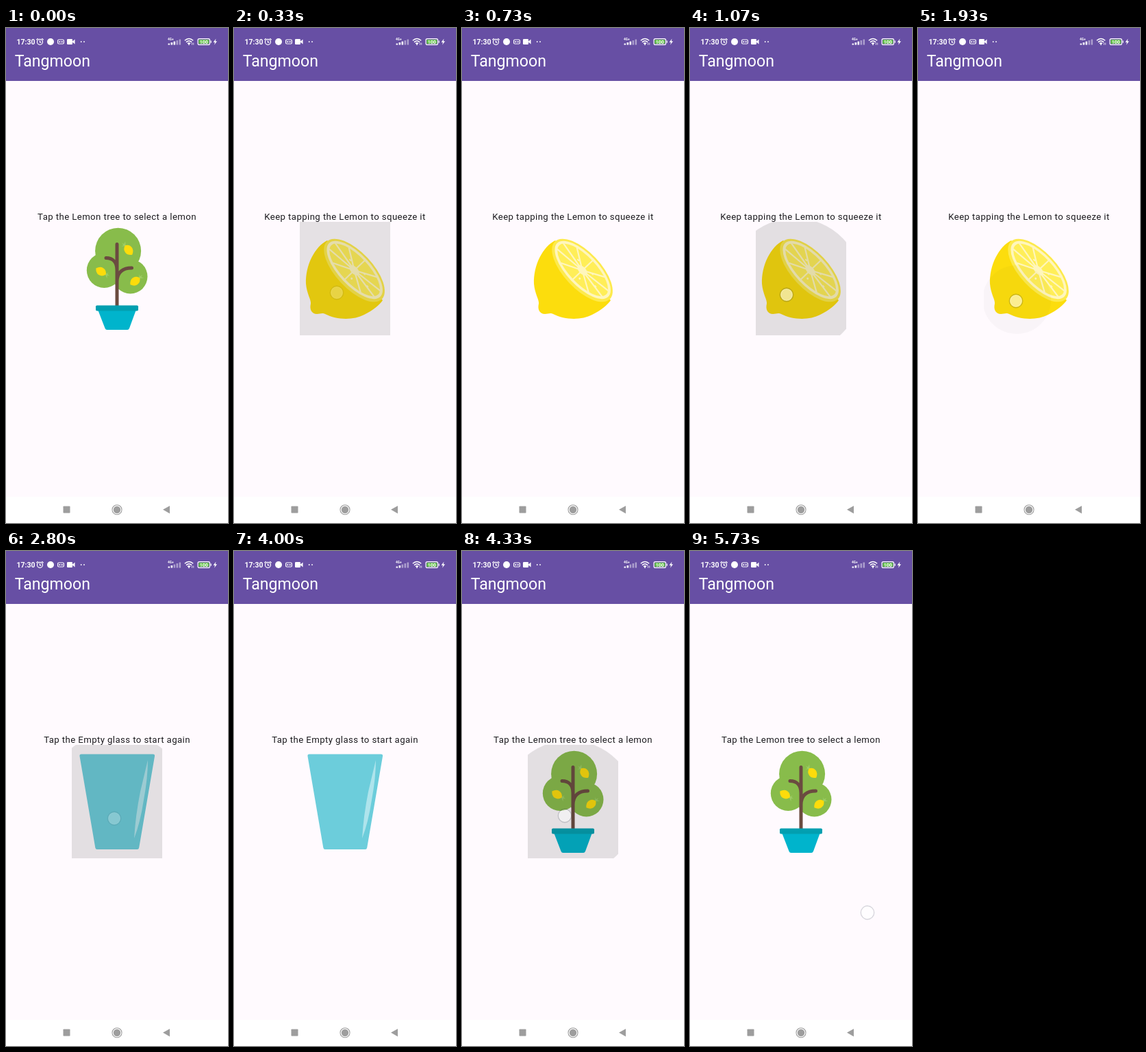
Recreate the animation shown at these times as an HTML page. Size 324x720 px, loop 5940 ms.

```html
<!DOCTYPE html>
<html lang="en">
<head>
<meta charset="utf-8">
<title>Tangmoon</title>
<style>
  html, body { margin: 0; width: 100%; height: 100%; overflow: hidden; background: #fffafe; }
  svg { display: block; width: 100vw; height: 100vh; font-family: Roboto, sans-serif; }
  .scene { visibility: hidden; }
  .scene.on { visibility: visible; }
  .scene text { font-size: 13.2px; letter-spacing: .4125px; text-anchor: middle; fill: #1c1b1f; }
  .line { fill: none; stroke: #fff; stroke-width: 1.2; }
</style>
</head>
<body>
<svg viewBox="0 0 324 720" preserveAspectRatio="none">
  <defs>
    <clipPath id="box"><rect x="96" y="282" width="132" height="165"/></clipPath>
    <path id="cup" d="M110 295.5H214.5Q217.5 295.5 217 298.5L194.2 431.5Q193.8 434 191.5 434H133Q130.700 434 130.300 431.5L107.500 298.5Q107 295.5 110 295.5Z"/>
    <path id="shine" d="M207 304Q207 330 201 362Q196 395 187 418Q189 385 196 350Z" fill="#fff" opacity=".45"/>
    <clipPath id="inCup"><use href="#cup"/></clipPath>
    <g id="fruit">
      <path d="M-7 0L-13 -4L-11 0L-14 1L-10 2L-11 5Z" fill="#9ccc65"/>
      <path d="M-8.500 0Q-6 -6 0 -6Q5 -6 8.500 0Q5 6 0 6Q-6 6 -8.500 0Z" fill="#fddc0b"/>
    </g>
  </defs>

  <rect width="324" height="720" fill="#fffafe"/>
  <rect width="324" height="77" fill="#674fa4"/>
  <text x="12.800" y="55.600" font-size="23.1" fill="#fff">Tangmoon</text>

  <!-- status bar -->
  <g fill="#fff">
    <text x="15.500" y="24" font-size="10.5" font-weight="600">17:30</text>
    <circle class="line" cx="49.500" cy="20.300" r="4"/>
    <path class="line" d="M49.500 17.800V20.800H51.500M44.300 17.300L46.800 15.300M54.700 17.300L52.200 15.300"/>
    <circle cx="65" cy="20" r="5"/>
    <rect class="line" x="75.600" y="17" width="8.800" height="6" rx="1.500"/>
    <path d="M77.300 19.300h2v1.600h-2zM80.700 19.300h2v1.600h-2z"/>
    <rect x="89" y="16" width="8" height="8" rx="1.200"/>
    <path d="M97 19.500L100.500 16.500V23.500L97 20.500Z"/>
    <circle cx="109.700" cy="20" r=".9"/><circle cx="114" cy="20" r=".9"/>
    <text x="236" y="18.300" font-size="4.800" font-weight="700">4G+</text>
    <g id="bars"></g>
    <g class="line">
      <path d="M260.800 18.300Q267 12.700 273.200 18.300M262.900 20.600Q267 17 271.100 20.600M265 22.700Q267 21 269 22.700" stroke-width="1.500"/>
      <path d="M271.500 21.500V24.500M273.700 24.500V21.500" stroke-width=".8"/>
    </g>
    <circle cx="267" cy="24" r="1"/>
    <rect class="line" x="280" y="15.600" width="17.500" height="8.800" rx="2.200"/>
    <rect x="281.300" y="16.900" width="14.900" height="6.200" rx="1" fill="#5fbf45"/>
    <rect x="298.600" y="18.300" width="1.200" height="3.400" rx=".5"/>
    <text x="288.800" y="22.600" font-size="7" font-weight="700" text-anchor="middle">100</text>
    <path d="M306.500 15.500L302.500 20.700H305L304 24.500L308 19.300H305.500Z"/>
  </g>

  <!-- scenes -->
  <g class="scene">
    <text x="162" y="278.700">Tap the Lemon tree to select a lemon</text>
    <g fill="#88bc4b">
      <circle cx="163.600" cy="324.300" r="33.500"/>
      <circle cx="143.300" cy="352.500" r="25.500"/>
      <circle cx="181.500" cy="361.500" r="25"/>
    </g>
    <path d="M162 314.500V405M146 334.500C156 334.500 162 341 162 352M183.500 349C171 349 162 355 162 369" fill="none" stroke="#6b4b40" stroke-width="5" stroke-linecap="round"/>
    <use href="#fruit" transform="translate(179 323) rotate(52)"/>
    <use href="#fruit" transform="translate(138.500 354) rotate(212)"/>
    <use href="#fruit" transform="translate(188.300 368.300) rotate(145)"/>
    <path d="M134.500 411H189.500L180 436.800Q179.200 439 177 439H147.500Q145.300 439 144.500 436.800Z" fill="#00b4cc"/>
    <rect x="131" y="403.500" width="62" height="8" rx="1.800" fill="#029fb0"/>
  </g>

  <g class="scene">
    <text x="162" y="278.700">Keep tapping the Lemon to squeeze it</text>
    <path d="M136 309C118 318 104 345 105 372C106 386 113 396 112 401C110 409 113 416 121 416C126 416 129 414 133 416C150 425 175 425 190 417C203 411 213 402 217 396Z" fill="#fcdd0d"/>
    <g transform="translate(175.600 352.500) rotate(46.500)">
      <ellipse rx="58" ry="26.500" fill="#fdea4c"/>
      <ellipse cy="-.8" rx="54" ry="23" fill="#fff6bd"/>
      <ellipse cy="-.8" rx="49.500" ry="19.500" fill="#ffee58"/>
      <path id="spokes" stroke="#fff6bd" stroke-width="2.200"/>
      <ellipse rx="9" ry="5" fill="#fff6bd"/>
      <g fill="#fff6bd">
        <ellipse cx="-15" cy="-6" rx="2" ry="1"/><ellipse cx="14" cy="-7" rx="2" ry="1"/>
        <ellipse cx="6" cy="11" rx="1.500" ry="1.500"/><ellipse cx="30" cy="2" rx="2" ry="1"/>
      </g>
    </g>
  </g>

  <g class="scene">
    <text x="162" y="278.700">Tap the glass of Tangmoon to drink it</text>
    <use href="#cup" fill="#6ccddb"/>
    <rect x="100" y="323" width="124" height="112" fill="#fce34a" clip-path="url(#inCup)"/>
    <use href="#shine"/>
  </g>

  <g class="scene">
    <text x="162" y="278.700">Tap the Empty glass to start again</text>
    <use href="#cup" fill="#6ccddb"/>
    <use href="#shine"/>
  </g>

  <g clip-path="url(#box)"><circle id="ripple" fill="#1c1b1f"/></g>
  <g id="dot">
    <circle r="9.700" fill="none" stroke="#234" stroke-opacity=".2" stroke-width="1.400"/>
    <circle r="8.500" fill="#fff" fill-opacity=".55" stroke="#fff" stroke-opacity=".4" stroke-width="1.200"/>
  </g>

  <!-- navigation bar -->
  <rect y="682" width="324" height="38" fill="#fff"/>
  <g fill="#9d9d9d">
    <rect x="83.500" y="695.500" width="10" height="10" rx=".8"/>
    <circle cx="162" cy="700.700" r="5.200"/>
    <circle cx="162" cy="700.700" r="7" fill="none" stroke="#9d9d9d" stroke-width="1.100"/>
    <path d="M229 700.600L239 695V706.200Z"/>
  </g>
</svg>

<script>
const LOOP = 5940, FPS = 15, LAST = 5734;
const TREE = 0, LEMON = 1, DRINK = 2, EMPTY = 3;

// start: ripple begins, up: finger lifts, life: ripple length, swap: time the scene becomes next
const taps = [
  { start: 10,   x: 150, y: 385, up: 190,  life: 590, swap: 199,  next: LEMON },
  { start: 937,  x: 141, y: 388, up: 1140, life: 460, swap: 1199, next: LEMON },
  { start: 1853, x: 143, y: 397, up: 1990, life: 545, swap: 1999, next: DRINK },
  { start: 2613, x: 158, y: 389, up: 2725, life: 585, swap: 2730, next: EMPTY },
  { start: 4137, x: 150, y: 385, up: 4255, life: 590, swap: 4260, next: TREE },
  { start: 5530, x: 259, y: 526, up: 5655, life: 0 }
];

const $ = id => document.getElementById(id);
const clamp = v => Math.max(0, Math.min(1, v));
const mix = (a, b, k) => a + (b - a) * k;
const set = (el, attrs) => { for (const k in attrs) el.setAttribute(k, attrs[k]); };

// cubic-bezier(.4, 0, .2, 1)
function ease(x) {
  let lo = 0, hi = 1;
  for (let i = 0; i < 16; i++) {
    const s = (lo + hi) / 2, r = 1 - s;
    if (1.2 * s * r * r + .6 * s * s * r + s ** 3 < x) lo = s; else hi = s;
  }
  return 3 * lo * lo - 2 * lo ** 3;
}

let spokes = "";
for (let i = 0; i < 10; i++) {
  const a = (i + .5) * Math.PI / 5;
  spokes += `M0 0L${50 * Math.cos(a)} ${20 * Math.sin(a) - .8}`;
}
set($("spokes"), { d: spokes });

const bars = [];
for (let i = 0; i < 5; i++) {
  const h = 2 + i * 1.5;
  const bar = document.createElementNS("http://www.w3.org/2000/svg", "rect");
  set(bar, { x: 236.5 + i * 4, y: 24.5 - h, width: 2.6, height: h, rx: .5 });
  $("bars").append(bar);
  bars.push(bar);
}

const scenes = document.querySelectorAll(".scene");

function draw(time) {
  const t = Math.min(Math.floor(time * FPS / 1000 + .02) * 1000 / FPS, LAST);
  let scene = TREE, shade = 0, touch = 0;

  for (const tap of taps) {
    const age = t - tap.start;
    if (t >= tap.swap) scene = tap.next;
    if (age < 0) continue;
    if (age < tap.life) {
      const k = clamp(age / 225);
      shade = .12 * clamp(age / 75) * clamp((tap.life - age) / (tap.life - 240));
      set($("ripple"), {
        cx: mix(tap.x, 162, k),
        cy: mix(tap.y, 364.5, k),
        r: mix(49.5, 106, ease(k))
      });
    }
    const alpha = clamp(1 - (t - tap.up) / 130);
    if (alpha > 0) {
      touch = alpha;
      set($("dot"), { transform: `translate(${tap.x} ${tap.y})` });
    }
  }

  scenes.forEach((el, i) => el.classList.toggle("on", i === scene));
  set($("ripple"), { opacity: shade });
  set($("dot"), { opacity: touch });
  const lit = t < 1999 ? 3 : 2;
  bars.forEach((bar, i) => set(bar, { opacity: i < lit ? 1 : .45 }));
}

const begin = performance.now();
function tick() {
  draw((performance.now() - begin) % LOOP);
  requestAnimationFrame(tick);
}
tick();
</script>
</body>
</html>
```
